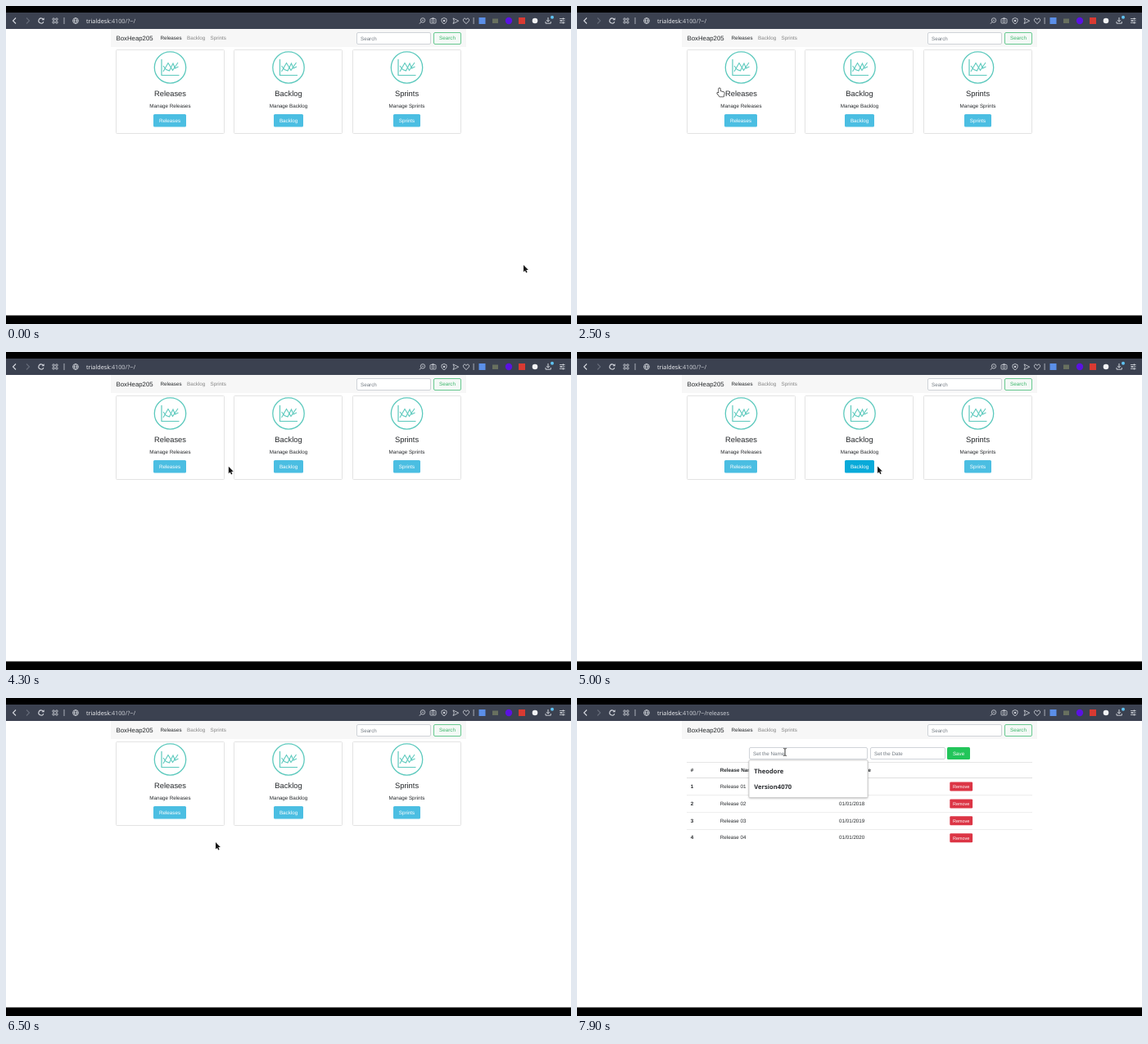
These frames come from a looping animation (690x388 px, 8 s). An HTML page with a canvas:

```html
<!DOCTYPE html>
<html lang="en">
<head>
<meta charset="utf-8">
<title>Release manager</title>
<style>
html, body { margin: 0; width: 100%; height: 100%; overflow: hidden; background: #000; }
canvas { display: block; }
</style>
</head>
<body>
<canvas id="stage" width="690" height="388"></canvas>
<script>
const ctx = document.getElementById('stage').getContext('2d');
const LOOP = 8000, STEP = 100, PAGE_AT = 6900, MENU_AT = 7800;
const SANS = '"Liberation Sans", Arial, sans-serif';
const UI = '"Open Sans", "Noto Sans", sans-serif';
const BASE = 6.25;
const INK = '#26292c', ICON = '#d5d8df', TEAL = '#5cc9bd';

const cards = [
  { name: 'Releases', x: 134, btn: [180, 40] },
  { name: 'Backlog', x: 278.5, btn: [327, 36] },
  { name: 'Sprints', x: 423, btn: [473, 33] }
];

// Pointer path: time, x, y
const path = [
  [0, 632, 316], [1200, 632, 316], [1300, 588, 287], [1700, 330, 165], [2000, 175, 100],
  [2400, 175, 100], [2500, 174, 100], [2600, 176, 100], [3000, 176, 100],
  [3450, 198, 131], [3600, 201.5, 137], [3900, 217, 140], [4000, 221, 140],
  [4800, 356.5, 139.5], [4900, 356.5, 139.5], [5000, 367, 139.5], [5300, 427, 149],
  [5500, 474, 144], [5700, 489, 139.5], [5800, 504, 123], [5900, 504, 123],
  [6000, 517, 100], [6200, 470, 47], [6300, 400, 80], [6500, 256, 176],
  [6700, 205.5, 137.5], [6900, 205.5, 137.5], [7300, 225, 110], [7700, 254, 66], [LOOP, 254, 66]
];

function pointerAt(t) {
  t = Math.max(0, t);
  const i = Math.max(1, path.findIndex(p => p[0] >= t));
  const [t0, x0, y0] = path[i - 1], [t1, x1, y1] = path[i];
  const k = (t - t0) / (t1 - t0);
  return { x: x0 + (x1 - x0) * k, y: y0 + (y1 - y0) * k };
}

const inside = (p, x, y, w, h) => p.x >= x && p.x <= x + w && p.y >= y && p.y <= y + h;

// Short colour transition, taken from where the pointer has just been
function hoverLevel(t, x, y, w, h) {
  const hits = [50, 100, 150].filter(lag => inside(pointerAt(t - lag), x, y, w, h));
  return hits.length / 3;
}

function mix(a, b, k) {
  return `rgb(${a.map((v, i) => Math.round(v + (b[i] - v) * k)).join()})`;
}

function rect(x, y, w, h, fill) {
  ctx.fillStyle = fill;
  ctx.fillRect(x, y, w, h);
}

function box(x, y, w, h, fill, stroke, r = 1.5) {
  ctx.beginPath();
  ctx.roundRect(x, y, w, h, r);
  if (fill) { ctx.fillStyle = fill; ctx.fill(); }
  if (stroke) { ctx.strokeStyle = stroke; ctx.lineWidth = 0.8; ctx.stroke(); }
}

function text(str, x, y, { size = BASE, color = INK, align = 'left', weight = 400, font = SANS } = {}) {
  ctx.font = `${weight} ${size}px ${font}`;
  ctx.textAlign = align;
  ctx.fillStyle = color;
  ctx.fillText(str, x, y + size * 0.36);
}

function line(points, color = ICON, width = 1) {
  ctx.beginPath();
  points.forEach(([x, y]) => ctx.lineTo(x, y));
  ctx.strokeStyle = color;
  ctx.lineWidth = width;
  ctx.stroke();
}

function arc(x, y, r, color = ICON, width = 1, from = 0, to = Math.PI * 2) {
  ctx.beginPath();
  ctx.arc(x, y, r, from, to);
  ctx.strokeStyle = color;
  ctx.lineWidth = width;
  ctx.stroke();
}

function dot(x, y, r, fill) {
  ctx.beginPath();
  ctx.arc(x, y, r, 0, Math.PI * 2);
  ctx.fillStyle = fill;
  ctx.fill();
}

function shape(d, x, y, fill, stroke, width = 1) {
  const p = new Path2D(d);
  ctx.save();
  ctx.translate(x, y);
  ctx.lineJoin = 'round';
  if (stroke) { ctx.strokeStyle = stroke; ctx.lineWidth = width; ctx.stroke(p); }
  if (fill) { ctx.fillStyle = fill; ctx.fill(p); }
  ctx.restore();
}

function toolbar(onReleases) {
  rect(0, 8, 690, 20, '#3b4150');
  line([[12, 14.5], [8.5, 18], [12, 21.5]], ICON, 1.1);
  line([[25, 14.5], [28.5, 18], [25, 21.5]], '#656b79', 1.1);
  arc(43, 18, 3.1, ICON, 1.1, 0.4, 5.5);
  shape('M0 0 V3 H-3 Z', 46.6, 14.2, ICON);
  for (const x of [57, 60.8]) for (const y of [15, 18.8]) box(x, y, 2.2, 2.2, null, ICON, 0.3);
  rect(70.5, 14, 1, 8, '#a9adb7');
  arc(85, 18, 3.4, ICON, 0.8);
  ctx.beginPath();
  ctx.ellipse(85, 18, 1.5, 3.4, 0, 0, Math.PI * 2);
  ctx.stroke();
  line([[81.6, 18], [88.4, 18]], ICON, 0.7);

  const host = 'trialdesk';
  const style = { size: 7.25, color: '#f4f5f7', font: UI };
  text(host, 98, 18, style);
  const hostWidth = ctx.measureText(host).width;
  text(':4100/?~/' + (onReleases ? 'releases' : ''), 98 + hostWidth, 18, { ...style, color: '#d3d6dc' });

  arc(509, 17.4, 2.7, ICON, 0.8);
  line([[507, 19.5], [505, 21.6]], ICON, 1);
  line([[507.8, 17.4], [510.2, 17.4]], ICON, 0.7);
  box(518, 15.6, 7, 5.4, null, ICON, 0.8);
  arc(521.5, 18.3, 1.4, ICON, 0.8);
  line([[520, 15], [523, 15]], ICON, 1);
  shape('M0 -3.5 L3 -2.3 V.5 Q2.5 2.7 0 3.8 Q-2.5 2.7 -3 .5 V-2.3 Z', 535, 18, null, ICON, 0.8);
  dot(535, 18, 1.2, ICON);
  shape('M-3 -3.3 L3.7 0 L-3 3.3 L-1.7 0 Z', 549, 18.2, null, ICON, 0.8);
  shape('M0 3.4 L-3 .3 C-5 -2.5 -1.5 -4.6 0 -1.8 C1.5 -4.6 5 -2.5 3 .3 Z', 562, 18.3, null, ICON, 0.9);
  rect(570.6, 14, 1, 8, '#a9adb7');

  rect(577.5, 14, 8, 8, '#5b8fe8');
  rect(594, 15.5, 7, 5.5, '#68705f');
  dot(614, 18, 4.2, '#5a12e2');
  rect(626, 14, 8, 8, '#d93a32');
  dot(646, 18, 3.3, '#f1f2f4');

  line([[662, 14], [662, 19]], ICON, 1);
  line([[660, 17.2], [662, 19.2], [664, 17.2]], ICON, 1);
  line([[659, 19], [659, 21.2], [665.3, 21.2], [665.3, 19]], ICON, 0.9);
  dot(667, 13.7, 2, '#5fc3f2');
  [15.5, 18, 20.5].forEach((y, i) => {
    line([[676, y], [682.5, y]], ICON, 0.8);
    dot(i === 1 ? 678 : 680.5, y, 0.9, ICON);
  });
}

function field(x, y, w, h, hint) {
  box(x + 0.5, y + 0.5, w - 1, h - 1, '#fff', '#c5cad0');
  text(hint, x + 5, y + h / 2, { color: '#737b83' });
}

function navbar() {
  rect(128, 28, 434, 22, '#f7f7f7');
  text('BoxHeap205', 134.5, 39, { size: 7.8 });
  text('Releases', 188.5, 39);
  text('Backlog', 221, 39, { color: '#858585' });
  text('Sprints', 249.5, 39, { color: '#858585' });
  field(428, 32, 91, 15, 'Search');
  box(522.5, 32.5, 33, 14, '#f4f9f6', '#45bd76');
  text('Search', 539, 39, { color: '#3cb76c', align: 'center' });
}

function chartIcon(x, y) {
  arc(x, y, 19.2, TEAL, 1.3);
  line([[x - 10.5, y - 10], [x - 10.5, y + 9.5], [x + 11, y + 9.5]], TEAL, 1.2);
  line([[x - 8.5, y + 5], [x - 2.5, y - 5.5], [x + 3, y + 3.5], [x + 9.5, y - 6]], TEAL, 1.1);
  line([[x - 8.5, y - 2], [x - 5, y + 2.5], [x - 1, y + 4], [x + 3.5, y - 5], [x + 6, y + 1], [x + 10, y - 1]], TEAL, 1.1);
}

function home(t) {
  for (const { name, x, btn: [bx, bw] } of cards) {
    const mid = x + 66.5;
    box(Math.floor(x) + 0.5, 53.5, 132, 102, '#fff', '#dcdcdc', 1);
    chartIcon(mid, 75);
    text(name, mid, 106.7, { size: 9.37, align: 'center' });
    text('Manage ' + name, mid, 121.3, { align: 'center' });
    const k = hoverLevel(t, bx, 132, bw, 15.5);
    box(bx, 132, bw, 15.5, mix([75, 190, 226], [9, 170, 217], k));
    text(name, bx + bw / 2, 139.7, { color: '#fff', align: 'center' });
  }
}

function releases(p) {
  field(210, 60, 145, 15, 'Set the Name');
  field(358, 60, 92, 15, 'Set the Date');
  box(452, 60, 28, 15, '#22c55a');
  text('Save', 466, 67.5, { color: '#fff', align: 'center' });

  rect(134, 78, 422, 0.7, '#dcdcdc');
  const bold = { weight: 700 };
  text('#', 138.8, 88, bold);
  text('Release Name', 174.8, 88, bold);
  text('Release Date', 320, 88, bold);
  rect(134, 97, 422, 0.9, '#dcdcdc');
  for (let i = 0; i < 4; i++) {
    const top = 97.5 + i * 20.9, mid = top + 10;
    if (inside(p, 134, top, 422, 20.8)) rect(134, top + 0.5, 422, 20.6, '#ebebeb');
    if (i) rect(134, top, 422, 0.6, '#e2e2e2');
    text(String(i + 1), 138.8, mid, bold);
    text('Release 0' + (i + 1), 174.8, mid);
    text('01/01/' + (2017 + i), 320, mid);
    box(455.3, top + 5, 27.8, 11, '#dc3545', null, 1.2);
    text('Remove', 469.2, top + 10.5, { size: 5.47, color: '#fff', align: 'center' });
  }
}

function suggestions() {
  ctx.save();
  ctx.shadowColor = 'rgba(0,0,0,.35)';
  ctx.shadowBlur = 2.5;
  ctx.shadowOffsetY = 0.8;
  box(210, 76, 145, 45.5, '#fff', null, 1);
  ctx.restore();
  box(210, 76, 145, 45.5, null, '#c8c8c8', 1);
  const style = { size: 7.6, weight: 700, font: UI, color: '#2b2d31' };
  text('Theodore', 216.3, 89, style);
  text('Version4070', 216.3, 107.8, style);
}

function pointer({ x, y }, onReleases) {
  const overTitle = !onReleases && y >= 99 && y <= 113 &&
    cards.some(c => x > c.x + 6 && x < c.x + 127);
  if (overTitle) {
    shape('M-.8 6 V1 Q0 -.3 .9 1 V4 L4.8 4.9 Q6 5.3 5.8 6.6 L5 10.4 H.2 L-2.8 6.6 Q-2.8 5 -.8 6.6 Z',
      x, y, '#fff', '#333', 1.5);
  } else if (onReleases && y >= 60 && y <= 75) {
    shape('M-1.8 -4.5 Q0 -4.5 0 -3.5 Q0 -4.5 1.8 -4.5 M0 -3.5 V3.5 M-1.8 4.5 Q0 4.5 0 3.5 Q0 4.5 1.8 4.5',
      x, y, null, '#333', 1);
  } else {
    shape('M0 0 V8.4 L1.9 6.7 L3.2 9.6 L4.6 9 L3.3 6.1 L5.9 5.9 Z', x, y, '#161616', '#fff', 1.1);
  }
}

function draw(t) {
  const p = pointerAt(t), onReleases = t >= PAGE_AT;
  ctx.textRendering = 'geometricPrecision';
  rect(0, 0, 690, 388, '#000');
  rect(0, 28, 690, 349.5, '#fff');
  toolbar(onReleases);
  navbar();
  if (onReleases) releases(p); else home(t);
  if (t >= MENU_AT) suggestions();
  pointer(p, onReleases);
}

const start = performance.now();
function tick() {
  const t = (performance.now() - start) % LOOP;
  draw(Math.floor(t / STEP) * STEP);
  requestAnimationFrame(tick);
}
tick();
</script>
</body>
</html>
```
